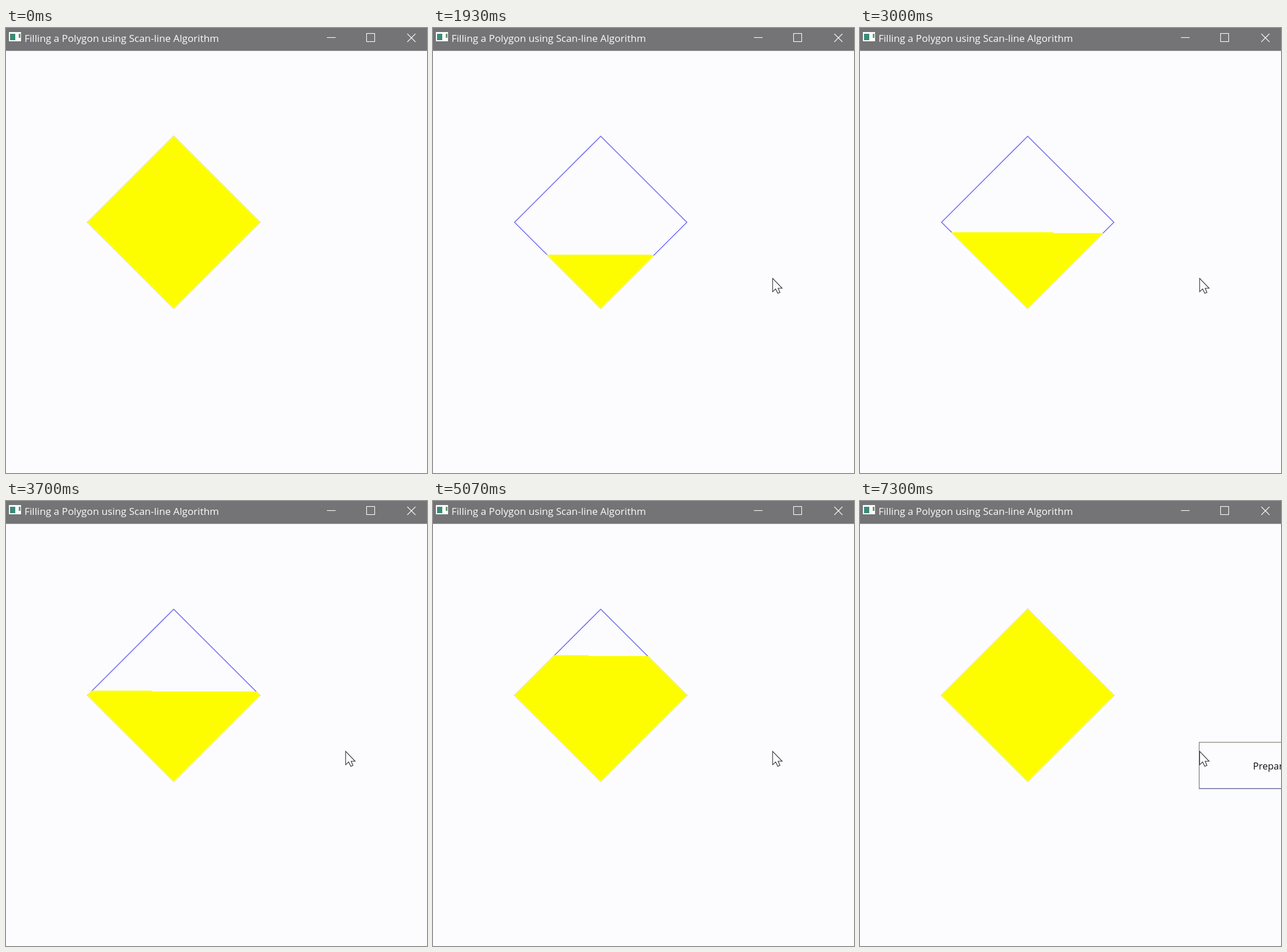
Write an HTML page that moves like this. It is 728 px wide and 769 px high and loops after 7.33 s.

```html
<!DOCTYPE html>
<html lang="en">
<head>
<meta charset="utf-8">
<title>Scan-line fill</title>
<style>
  html, body { margin: 0; width: 100%; height: 100%; overflow: hidden; background: #fcfcfe; }
  svg { display: block; }
  text { font-family: "Open Sans", "Noto Sans", sans-serif; }
</style>
</head>
<body>
<svg width="728" height="769" viewBox="0 0 728 769">
  <defs>
    <clipPath id="filled"><path id="level"/></clipPath>
    <path id="diamond" d="M290 187L439 335.7L290 484.5L141 335.7Z"/>
  </defs>

  <rect width="728" height="39.5" fill="#747476"/>
  <rect x="5" y="7" width="21" height="16" fill="#fcfcfc"/>
  <rect x="7" y="10" width="9" height="11" fill="#3a8a78"/>
  <rect x="22" y="10" width="3" height="7" fill="#6a9a70"/>
  <text x="31.9" y="24" font-size="17.2" fill="#fcfcfc">Filling a Polygon using Scan-line Algorithm</text>
  <g fill="none" stroke="#fcfcfc" stroke-width="1.1">
    <path d="M555 16.5H570"/>
    <rect x="623.5" y="9.5" width="14" height="14"/>
    <path d="M694 10L708 24M708 10L694 24"/>
  </g>

  <use href="#diamond" fill="none" stroke="#6c6af4" stroke-width="1.5"/>
  <g clip-path="url(#filled)">
    <use href="#diamond" fill="#fdfd00" stroke="#ffff48" stroke-width="1.5" stroke-linejoin="bevel"/>
  </g>

  <g id="menu">
    <rect x="586.5" y="417" width="200" height="80" fill="#fcfcfe" stroke="#66665c"/>
    <path d="M587 497H728" stroke="#6c6cc0"/>
    <text x="679.6" y="464" font-size="16.5" fill="#101010">Preparing</text>
  </g>
  <path id="cursor" d="M587.3 432.5V455.8L592.5 451L596.2 458.6L600 457L596.8 449.8H603.8Z"
        fill="#fcfcfe" stroke="#303030" stroke-width="1.1"/>
</svg>
<script>
const LOOP = 7330, ROWS = 200, HALF = 149, CX = 290, CY = 335.7, BOTTOM = 485.6;
const PITCH = 2 * HALF / ROWS;
// [time in ms, rows painted]; painting speed is steady per pixel between them
const keys = [[670, 5.5], [1170, 39.29], [1930, 62.98], [3000, 88.67],
              [4430, 124.92], [5070, 146.37], [5730, 200]];
const $ = id => document.getElementById(id);
const show = (id, on) => $(id).setAttribute("visibility", on ? "visible" : "hidden");

const area = r => r <= 100 ? r * r / 2 : 10000 - (ROWS - r) ** 2 / 2;
const rowsFor = a => a <= 5000 ? Math.sqrt(2 * a) : ROWS - Math.sqrt(2 * (10000 - a));

function rowsAt(t) {
  const i = keys.findIndex(k => k[0] > t);
  if (i < 1) return ROWS;
  const [t0, r0] = keys[i - 1], [t1, r1] = keys[i];
  const a0 = area(r0), a1 = area(r1);
  return rowsFor(a0 + (a1 - a0) * (t - t0) / (t1 - t0));
}

function levelPath(rows) {
  if (rows >= ROWS) return "M0 100H728V600H0Z";
  const row = Math.floor(rows), y = BOTTOM - PITCH * row;
  const w = HALF - Math.abs(y - PITCH / 2 - CY);
  const x = CX - w + 2 * w * (rows - row);
  return `M0 ${y - PITCH}H${x}V${y}H728V600H0Z`;
}

function draw(t) {
  $("level").setAttribute("d", levelPath(rowsAt(t)));
  show("cursor", t >= 430);
  show("menu", t >= 7300);
}

let start;
function tick(now) {
  start ??= now;
  draw((now - start) % LOOP);
  requestAnimationFrame(tick);
}
draw(0);
requestAnimationFrame(tick);
</script>
</body>
</html>
```
